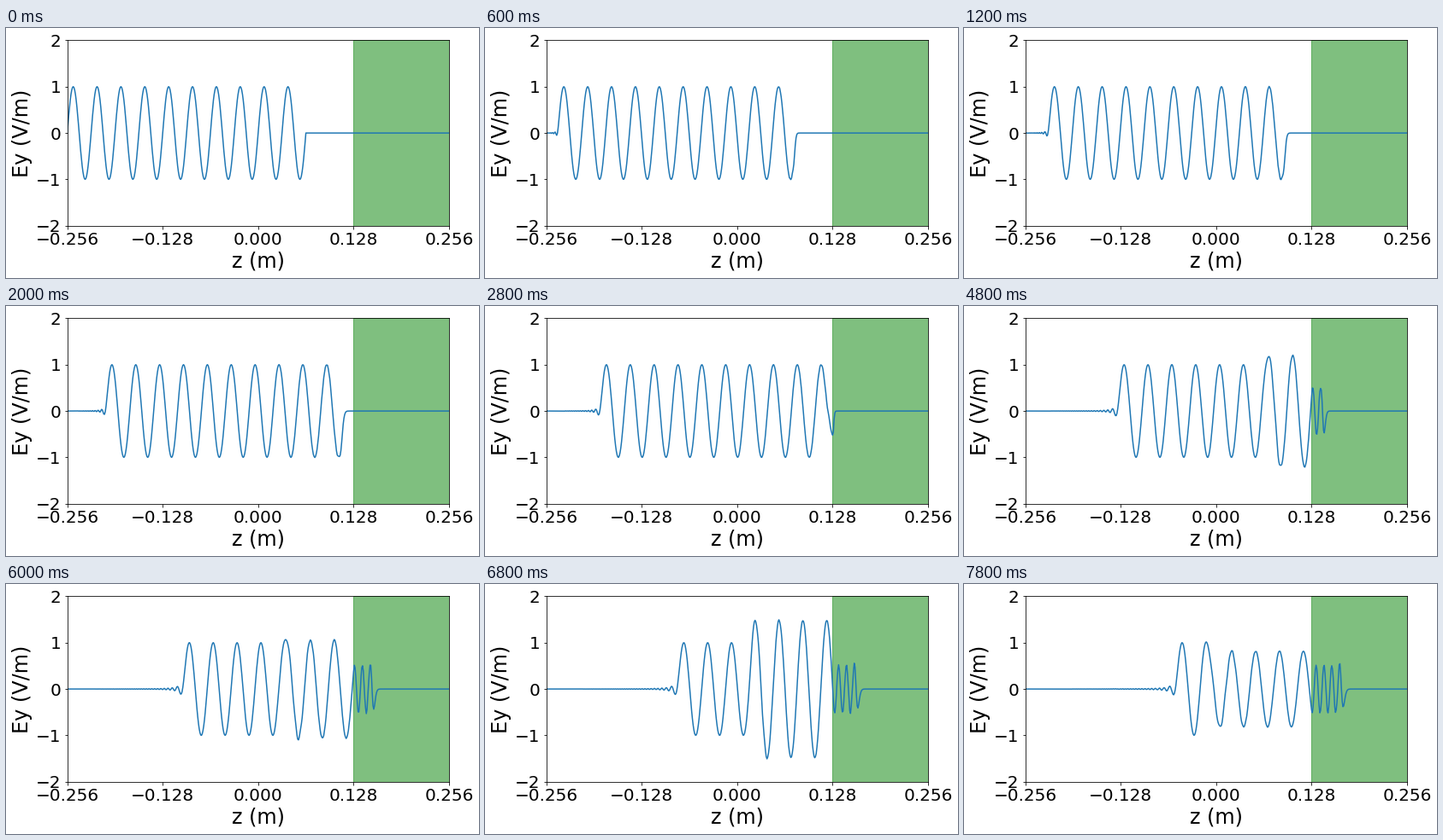
A matplotlib script for the animation above (8000 ms loop, 553x293 px).

```python
import numpy as np
import matplotlib.pyplot as plt
from matplotlib.animation import FuncAnimation

W, H, DPI = 553, 293, 72
FRAMES, INTERVAL = 40, 200

# 1D grid in metres; magnetic field is scaled by the wave impedance
DZ = 0.001
COURANT = 0.9 / np.sqrt(3)
STEPS = 10
WAVELENGTH = 0.032
START, FRONT = -0.256, 0.064
SLAB, EDGE = 0.128, 0.256
EPS = 9.0

z = START + DZ * np.arange(513)


def pulse(x):
    inside = (x >= START) & (x <= FRONT)
    return np.where(inside, np.sin(2 * np.pi * (x - START) / WAVELENGTH), 0.0)


def simulate():
    """Leapfrog the fields and keep the electric field of every frame."""
    # the node on the slab surface gets the mean permittivity
    share = np.clip((z - SLAB) / DZ + 0.5, 0, 1)
    eps = 1 + (EPS - 1) * share
    e = pulse(z)
    h = pulse(z[:-1] + DZ / 2 - COURANT * DZ / 2)
    fields = [e.copy()]
    for _ in range(FRAMES - 1):
        for _ in range(STEPS):
            e[1:-1] -= COURANT / eps[1:-1] * np.diff(h)
            h -= COURANT * np.diff(e)
        fields.append(e.copy())
    return fields


fields = simulate()

plt.rcParams["font.family"] = "DejaVu Sans"
plt.rcParams["font.size"] = 20
fig = plt.figure(figsize=(W / DPI, H / DPI), dpi=DPI, facecolor="white")
ax = fig.add_axes([71.6 / W, 61.2 / H, 446.4 / W, 217.44 / H])
ax.axvspan(SLAB, EDGE, color="green", alpha=0.5)
line, = ax.plot(z, fields[0])
ax.set_xlim(START, EDGE)
ax.set_ylim(-2, 2)
ax.set_xticks(np.linspace(START, EDGE, 5))
ax.set_yticks(range(-2, 3))
ax.set_xlabel("z (m)", fontsize=24)
ax.set_ylabel("Ey (V/m)", fontsize=24)


def draw(i):
    line.set_ydata(fields[i])
    return line,


anim = FuncAnimation(fig, draw, frames=FRAMES, interval=INTERVAL,
                     init_func=lambda: draw(0), repeat=True, repeat_delay=0)
plt.show()
```
